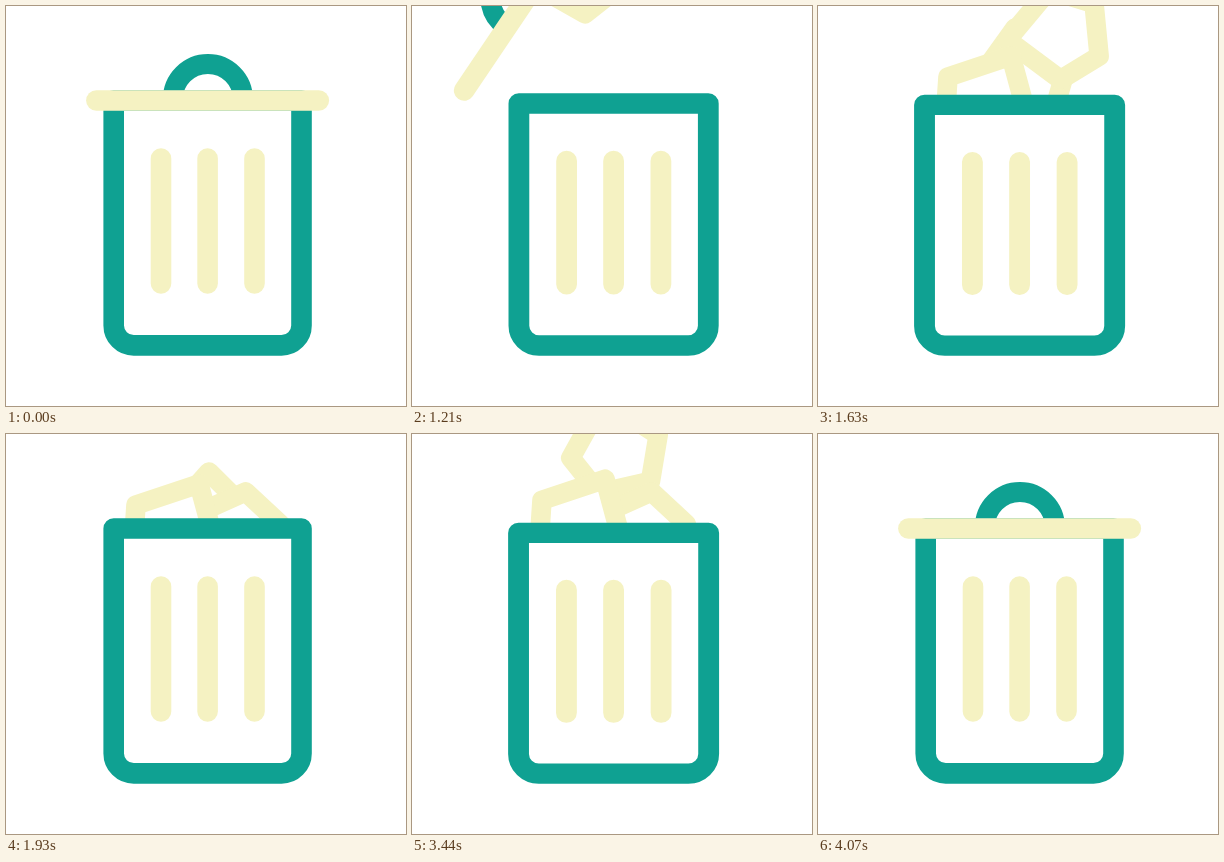
Animation of 400 by 400 pixels, one loop 4.1 s. Source, as an HTML page:

```html
<!DOCTYPE html>
<html lang="en">
<head>
<meta charset="utf-8">
<title>Trash bin</title>
<style>
  html, body { margin: 0; width: 100%; height: 100%; overflow: hidden; background: #fff; }
  svg { display: block; width: 100%; height: 100%; }
  svg * { stroke-linecap: round; stroke-linejoin: round; }
  .teal { stroke: #0fa192; stroke-width: 20.6; fill: #fff; }
  .cream { stroke: #f5f2c2; stroke-width: 20.6; fill: #fff; }
  .paper { stroke-width: 19.6; }
  .handle { fill: none; stroke-width: 20; stroke-linecap: butt; }
</style>
</head>
<body>
<svg viewBox="0 0 400 400">
  <defs>
    <path id="sheet" d="M-36.6-27.4 26.4-48.4 43.4 14.6 6.4 43.6-39.6 17.6Z"/>
  </defs>
  <use id="middle" class="cream paper" href="#sheet"/>
  <use id="right" class="cream paper" href="#sheet"/>
  <use id="left" class="cream paper" href="#sheet"/>
  <g id="bin">
    <path class="teal" d="M107.7 94.5H295.5V319.4a20 20 0 0 1-20 20H127.7a20 20 0 0 1-20-20Z"/>
    <path class="cream" d="M155 152.6V277.5M201.6 152.6V277.5M248.5 152.6V277.5"/>
  </g>
  <g id="lid">
    <path class="teal handle" d="M76.5-1.5a35 35 0 0 1 70 0"/>
    <path class="cream" d="M0 0H222.4"/>
  </g>
</svg>
<script>
const LOOP = 4100, STEP = 30;
const OPEN = 1030, FULL = 1930, EMPTYING = 3140, CLOSED = 4070;
const el = id => document.getElementById(id);

// Each sheet drops with an ease-out ending at `land` and lifts with an ease-in from `leave`.
const sheets = [
  { id: 'left', x: 166.6, y: 98.4, angle: 0, spin: 0, drift: 0, land: 1611, leave: 3364 },
  { id: 'middle', x: 204.3, y: 93.1, angle: -30, spin: -1.45, drift: 0, land: 1771, leave: 3143 },
  { id: 'right', x: 232, y: 103, angle: -99, spin: -3, drift: 12, land: FULL, leave: 3585 }
];

function placeSheet(s, t) {
  const away = 0.0289 * Math.max(0, t < 2500 ? s.land - t : t - s.leave);
  const x = s.x + s.drift * Math.min(1, away / 3.6);
  el(s.id).setAttribute('transform',
    `translate(${x} ${s.y - away * away}) rotate(${s.angle + s.spin * away})`);
}

function placeBin(t) {
  const hump = (a, b) => t > a && t < b ? Math.sin(Math.PI * (t - a) / (b - a)) : 0;
  const squash = hump(OPEN, FULL) + hump(EMPTYING, CLOSED);
  el('bin').setAttribute('transform',
    `translate(201.6 350) scale(${1 + 0.0145 * squash} ${1 - 0.0202 * squash}) translate(-201.6 -350)`);
}

// Swing is measured in units of five degrees.
function lidSwing(t) {
  if (t < OPEN) return 0;
  if (t < 2500) {
    const n = (t - OPEN) / STEP + 1;
    return 0.9 * n + 0.1 * n * n;
  }
  return 19.6 * (Math.max(0, CLOSED - t) / 360) ** 2;
}

function placeLid(t) {
  const u = lidSwing(t);
  const x = 90.4 - 2.8 * u - 0.055 * u * u;
  const y = 94.5 - 0.0794 * u * u;
  el('lid').setAttribute('visibility', u > 26 ? 'hidden' : 'visible');
  el('lid').setAttribute('transform', `translate(${x} ${y}) rotate(${-5 * u})`);
}

function snap(t) {
  const base = t >= EMPTYING ? EMPTYING : OPEN;
  return t < OPEN ? 0 : base + Math.floor((t - base) / STEP) * STEP;
}

function draw() {
  const t = snap(performance.now() % LOOP);
  sheets.forEach(s => placeSheet(s, t));
  placeBin(t);
  placeLid(t);
  requestAnimationFrame(draw);
}
draw();
</script>
</body>
</html>
```
